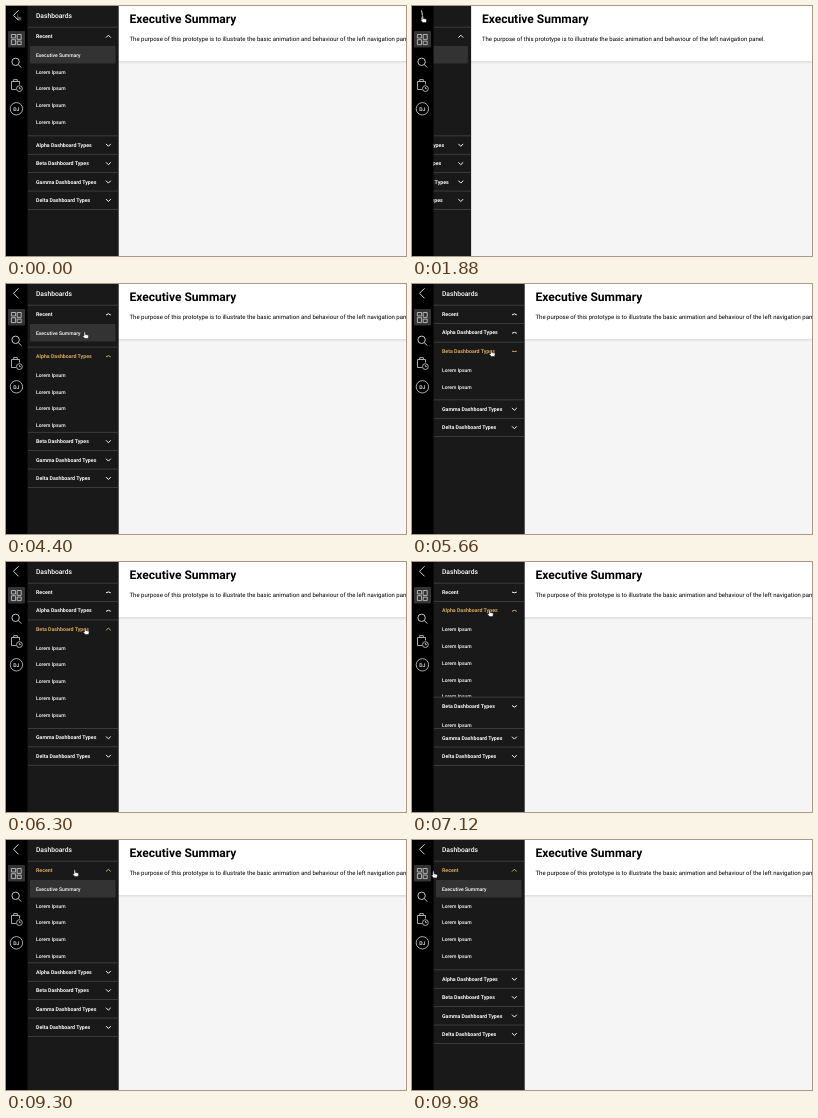
An HTML page for the animation above (10 s loop, 400 px wide and 250 px high).

```html
<!DOCTYPE html>
<html lang="en">
<head>
<meta charset="utf-8">
<title>Navigation panel</title>
<style>
  html, body { margin: 0; width: 100%; height: 100%; overflow: hidden; background: #f5f5f5; }
  #stage { display: block; width: 400px; height: 250px; font-family: Roboto, sans-serif; text-rendering: geometricPrecision; }
  .icon { fill: none; stroke: #c8c8c8; stroke-width: .85; stroke-linejoin: round; }
  .head { font-size: 5.25px; font-weight: 700; }
  .item { font-size: 5.05px; font-weight: 500; fill: #fff; }
  .chevron { fill: none; stroke-width: 1; vector-effect: non-scaling-stroke; }
</style>
</head>
<body>
<svg id="stage" viewBox="0 0 400 250">
  <defs>
    <linearGradient id="shade" x1="0" y1="0" x2="0" y2="1">
      <stop offset="0" stop-color="#000" stop-opacity=".1"/>
      <stop offset="1" stop-color="#000" stop-opacity="0"/>
    </linearGradient>
  </defs>
  <g id="page">
    <rect x="112" width="400" height="250" fill="#f5f5f5"/>
    <rect x="112" width="400" height="55" fill="#fff"/>
    <rect x="112" y="55" width="400" height="3" fill="url(#shade)"/>
    <text x="123.5" y="17.3" font-size="12" font-weight="700" fill="#000">Executive Summary</text>
    <text x="123.5" y="34.6" font-size="6" fill="#000">The purpose of this prototype is to illustrate the basic animation and behaviour of the left navigation panel.</text>
  </g>
  <g id="panel">
    <rect x="20" width="92.7" height="250" fill="#191919"/>
    <text x="30" y="11.8" font-size="6.7" font-weight="500" fill="#fff">Dashboards</text>
  </g>
  <g id="rail">
    <rect width="21.5" height="250" fill="#000"/>
    <path id="arrow" d="M2.5-5L-2.5 0L2.5 5" fill="none" stroke="#ddd" vector-effect="non-scaling-stroke"/>
    <rect x="2" y="25" width="17" height="16.5" rx="1" fill="#333"/>
    <g class="icon">
      <path d="M5.4 28.5h4.2v3.5h-4.2zM5.4 33.7h4.2v4.9h-4.2zM11.2 28.5h4v4.9h-4zM11.2 35.1h4v3.5h-4z"/>
      <path d="M12.3 58.6L15.3 61.6" stroke-width="1"/>
      <circle cx="9.6" cy="55.8" r="3.7" stroke-width="1"/>
      <path d="M10 83.5H5.5V75.5H13.5V78.5M7.7 75.5V73.6H11.3V75.5"/>
      <circle cx="13.4" cy="82.6" r="2.9"/>
      <path d="M13.4 81V82.7H14.8"/>
      <circle cx="10.4" cy="102.8" r="6.2"/>
    </g>
    <text x="10.4" y="104.7" font-size="5.2" font-weight="700" text-anchor="middle" fill="#ddd">DJ</text>
  </g>
  <path id="hand" d="M0 .4C.2-.4 1.2-.4 1.3.4V2.5L4 3.1Q4.7 3.4 4.6 4.2L4.1 6.6H.8L-1.3 4.2Q-1.2 3.3 0 4Z" fill="#fff" stroke="#111" stroke-width=".5"/>
</svg>
<script>
const LOOP = 10000, ROW = 18.4, BODY = 90.3;
const WHITE = [250, 250, 250], GOLD = [216, 168, 92];
const $ = id => document.getElementById(id);

function add(parent, tag, attrs, text) {
  const el = document.createElementNS('http://www.w3.org/2000/svg', tag);
  for (const k in attrs) el.setAttribute(k, attrs[k]);
  if (text) el.textContent = text;
  parent.append(el);
  return el;
}

// Critically damped approach to 1
const spring = (t, w) => t <= 0 ? 0 : 1 - (1 + w * t) * Math.exp(-w * t);

// Steps are [time, target, rate]
function follow(start, steps, t) {
  let value = start, last = start;
  for (const [at, to, rate = .0105] of steps) {
    value += (to - last) * spring(t - at, rate);
    last = to;
  }
  return value;
}

const SLIDE = [[1690, 90], [2890, 0, .016]];
const SECTIONS = [
  { name: 'Recent', start: 1,
    open: [[4150, 0], [8900, 1]],
    turn: [[4150, -.4], [6796, .4], [8000, 1], [8900, -1]],
    hover: [[3330, 1, .02], [4030, 0, .02], [8650, 1, .02]] },
  { name: 'Alpha Dashboard Types', start: 0,
    open: [[4150, 1], [4850, 0], [6796, 1], [8000, 0]],
    turn: [[4150, -1], [4850, -.4], [8000, 1]],
    hover: [[4030, 1, .02], [5100, 0, .02], [6600, 1, .02], [8600, 0, .02]] },
  { name: 'Beta Dashboard Types', start: 0,
    open: [[5520, 1], [6796, 0]],
    turn: [[5520, -1], [6796, 1]],
    hover: [[5100, 1, .02], [6600, 0, .02]] },
  { name: 'Gamma Dashboard Types', start: 0, open: [], turn: [], hover: [] },
  { name: 'Delta Dashboard Types', start: 0, open: [], turn: [], hover: [] }
];

// Fingertip: [time, x, y]
const PATH = [
  [0, 11, 8], [1000, 11, 8], [1500, 10, 10], [2950, 10, 10], [3340, 55, 31],
  [3750, 55, 31], [4100, 78, 48], [4850, 78, 48], [5300, 78.5, 66], [6400, 78.5, 66],
  [6750, 76.7, 48], [8400, 76.7, 48], [8800, 68, 30], [9500, 68, 30], [9980, 20.8, 31.3], [LOOP, 19, 29]
];

const line = { x: 21.5, width: 91.2, height: .7, fill: '#4a4a4a' };

for (const s of SECTIONS) {
  s.group = add($('panel'), 'g', {});
  add(s.group, 'rect', line);
  s.label = add(s.group, 'text', { x: 30, y: 11.3, class: 'head' }, s.name);
  s.chevron = add(s.group, 'path', { d: 'M-2.4-1.2L0 1.2L2.4-1.2', class: 'chevron' });
  s.body = add(s.group, 'svg', { x: 20, y: ROW, width: 92, height: BODY });
  const first = s.name === 'Recent';
  if (first) add(s.body, 'rect', { x: 4, y: .7, width: 85.5, height: 17.5, rx: 1, fill: '#333' });
  for (let i = 0; i < 5; i++) {
    const label = first && i === 0 ? 'Executive Summary' : 'Lorem Ipsum';
    add(s.body, 'text', { x: 10, y: 11.6 + i * 16.8, class: 'item' }, label);
  }
}
const footLine = add($('panel'), 'rect', line);

function pointer(t) {
  let i = 1;
  while (i < PATH.length - 1 && PATH[i][0] < t) i++;
  const [t0, x0, y0] = PATH[i - 1], [t1, x1, y1] = PATH[i];
  const k = (t - t0) / (t1 - t0), e = k * k * (3 - 2 * k);
  return [x0 + (x1 - x0) * e, y0 + (y1 - y0) * e];
}

function render(t) {
  const slide = follow(0, SLIDE, t);
  $('page').setAttribute('transform', `translate(${-slide})`);
  $('panel').setAttribute('transform', `translate(${-slide})`);
  $('arrow').setAttribute('transform', `translate(10 9.3) scale(${1 - slide / 45} 1)`);

  let y = 20.8;
  for (const s of SECTIONS) {
    const height = BODY * follow(s.start, s.open, t);
    const turn = follow(s.start ? -1 : 1, s.turn, t);
    const hover = follow(0, s.hover, t);
    const color = `rgb(${WHITE.map((c, i) => Math.round(c + (GOLD[i] - c) * hover))})`;
    s.group.setAttribute('transform', `translate(0 ${y})`);
    s.label.setAttribute('fill', color);
    s.chevron.setAttribute('stroke', color);
    s.chevron.setAttribute('transform', `translate(102.4 9.6) scale(1 ${turn})`);
    s.body.setAttribute('height', Math.max(0, height));
    s.body.style.display = height < .1 ? 'none' : '';
    y += ROW + height;
  }
  footLine.setAttribute('y', y);
  $('hand').setAttribute('transform', `translate(${pointer(t)})`);
  $('hand').setAttribute('opacity', Math.min(1, .35 + t / 600));
}

const begin = performance.now();
function tick() {
  render((performance.now() - begin) % LOOP);
  requestAnimationFrame(tick);
}
tick();
</script>
</body>
</html>
```
